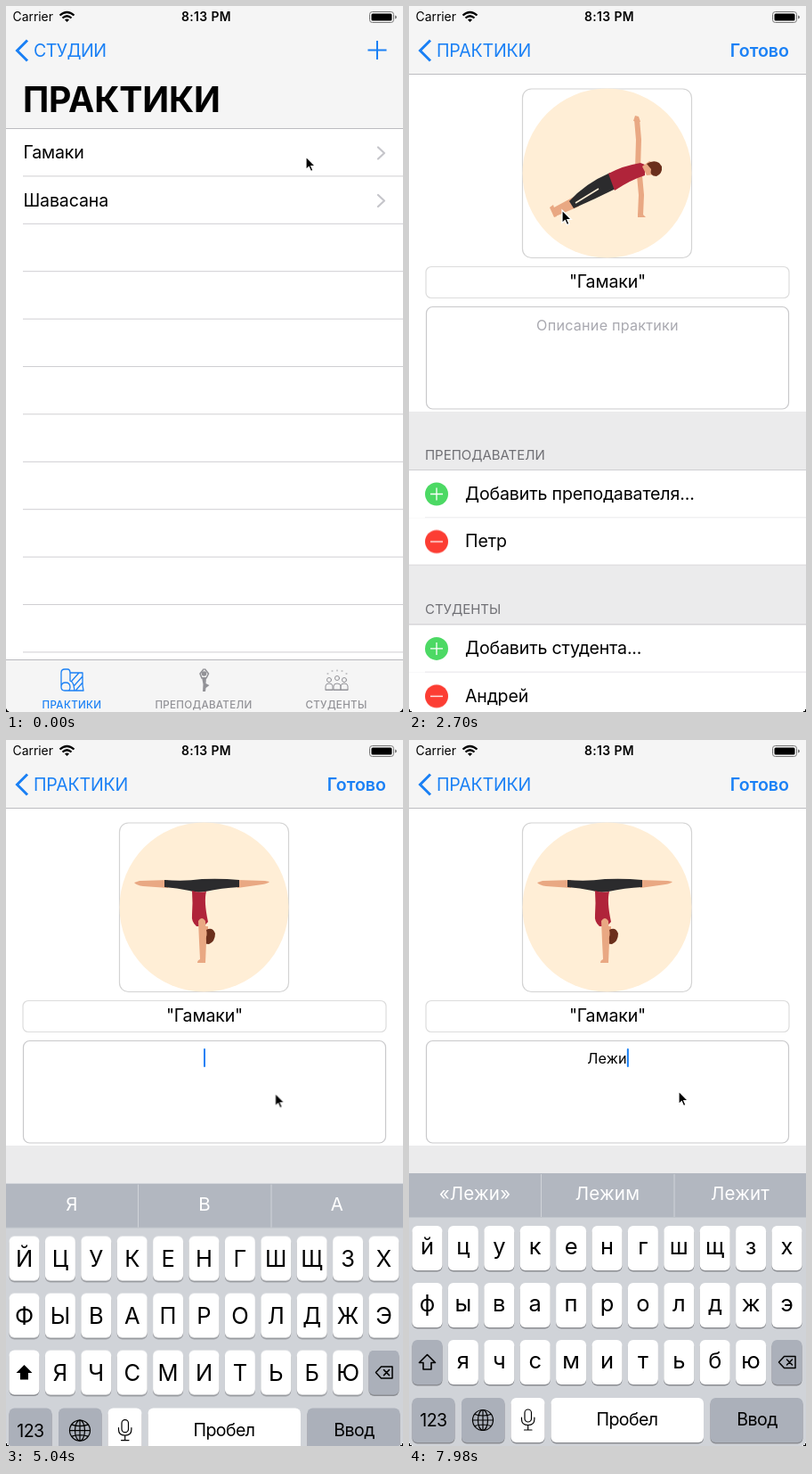
Write an HTML page that moves like this. It is 446 px wide and 792 px high and loops after 8 s.

```html
<!DOCTYPE html>
<html lang="ru">
<head>
<meta charset="utf-8">
<title>Практики</title>
<style>
html, body { margin: 0; width: 100%; height: 100%; overflow: hidden; background: #000; }
svg { display: block; width: 446px; height: 792px; border-radius: 0 0 6px 6px; background: #fff; }
text { font: 400 19.6px Inter, Roboto, sans-serif; letter-spacing: -.008em; }
.blue { fill: #1a80f5; }
.mid { text-anchor: middle; }
.end { text-anchor: end; }
.line { stroke: #cfced2; fill: none; }
.title { font-size: 39.2px; font-weight: 700; letter-spacing: -.004em; }
.back { letter-spacing: -.01em; }
.strong { font-weight: 600; letter-spacing: 0; }
.head { font-size: 15px; letter-spacing: -.002em; fill: #6f6f74; }
.hint { font-size: 16.2px; letter-spacing: .013em; }
.tab { font-size: 11.6px; font-weight: 500; letter-spacing: .025em; }
.status { font-size: 13.9px; letter-spacing: 0; }
.clock { font-weight: 600; letter-spacing: .03em; }
.key { font-size: 25.5px; letter-spacing: 0; }
.label { letter-spacing: -.03em; }
.guess { font-size: 20.5px; letter-spacing: .01em; fill: #fff; }
.icon { fill: none; stroke: currentColor; stroke-linecap: round; stroke-linejoin: round; }

.push, .edit, .fadeOut, .fadeIn, .dim, .glare, .done, .add, .minus, .keys, .pointer { animation: 8s linear infinite; }
.push { animation-name: push; }
.fadeOut { animation-name: fadeOut; }
.fadeIn { animation-name: fadeIn; }
.dim { animation-name: dim; }
.glare { animation-name: glare; }
.edit { animation-name: edit; }
.add { animation-name: add; }
.minus { animation-name: minus; }
.done { animation-name: done; }
.keys { animation-name: keys; }
.pointer { animation-name: pointer; }

@keyframes push {
  0%, 3.3% { transform: var(--from); animation-timing-function: ease; }
  9.55%, 100% { transform: var(--to); }
}
@keyframes fadeOut { 0%, 3.3% { opacity: 1; } 6%, 100% { opacity: 0; } }
@keyframes fadeIn { 0%, 3.5% { opacity: 0; } 7.2%, 100% { opacity: 1; } }
@keyframes dim { 0%, 3.3% { opacity: 0; animation-timing-function: ease; } 9.55%, 100% { opacity: .11; } }
@keyframes glare { 0%, 3.3% { opacity: 0; } 6.5%, 7.8% { opacity: 1; } 10.5%, 100% { opacity: 0; } }
@keyframes edit {
  0%, 21.375% { transform: translate(0, 0); animation-timing-function: ease-in-out; }
  25.75%, 100% { transform: var(--to); }
}
@keyframes add { 0%, 22% { opacity: 0; } 25.75%, 100% { opacity: 1; } }
@keyframes minus { 0%, 22.5% { fill: #e6e6e9; } 25.75%, 100% { fill: #fc3d33; } }
@keyframes done { 0%, 21.49% { opacity: 0; } 21.5% { opacity: .2; } 25%, 100% { opacity: 1; } }
@keyframes keys {
  0%, 59.3125% { transform: translateY(306px); animation-timing-function: cubic-bezier(.38, .7, .125, 1); }
  65.5625%, 100% { transform: none; }
}
@keyframes pointer {
  0%, 11.25% { transform: translate(337px, 169px); animation-timing-function: ease-in-out; }
  18.75%, 23.5% { transform: translate(361px, 59px); animation-timing-function: ease-in-out; }
  30%, 43% { transform: translate(172px, 229px); animation-timing-function: ease-in-out; }
  55%, 60.5% { transform: translate(302px, 398px); animation-timing-function: ease-in-out; }
  66%, 100% { transform: translate(303px, 394px); }
}
</style>
</head>
<body>
<svg id="stage" viewBox="0 0 446 792"></svg>
<script>
const LOOP = 8000, ROW = 53.4;
const EDIT = 1720, FOCUS = 4740, TYPED = [6540, 6960, 7380, 7740];
const stage = document.getElementById('stage');

// Visible from the first time to the second, and so on in pairs.
const during = (times, body) => `<g data-on="${times.join(' ')}">${body}</g>`;
const text = (x, y, str, cls = '', extra = '') => `<text x="${x}" y="${y}" class="${cls}" ${extra}>${str}</text>`;
const rect = (x, y, w, h, fill, extra = '') => `<rect x="${x}" y="${y}" width="${w}" height="${h}" fill="${fill}" ${extra}/>`;
const rule = (x, y) => `<path class="line" d="M${x} ${y}H446"/>`;
const path = (d, fill) => `<path d="${d}" fill="${fill}"/>`;
const limb = (d, color, width) => `<path d="${d}" fill="none" stroke="${color}" stroke-width="${width}" stroke-linejoin="round"/>`;
const shift = (x, y) => `class="edit" style="--to:translate(${x}px,${y}px)"`;
const pushed = (from, to) => `style="--from:translate(${from});--to:translate(${to})"`;

function listPage() {
  let rows = '';
  for (let i = 1; i <= 11; i++) rows += rule(19, 137.5 + ROW * i);
  const chevron = y => `<path class="icon" color="#c5c5ca" stroke-width="2.2" d="M418 ${y - 6}l7 6.500-7 6.500"/>`;
  return `<g class="push" ${pushed('0,0', '-134px,0')}>
    ${rect(0, 0, 446, 792, '#fff')}
    ${during([120], rect(0, 138, 446, 53, '#d9d9de'))}
    ${rows}
    ${text(19.5, 171, 'Гамаки')}${chevron(164.5)}
    ${text(19.5, 224.5, 'Шавасана')}${chevron(218)}
    ${rect(0, 734, 446, 58, '#f5f5f5')}<path stroke="#b9b9bd" d="M0 733.500H446"/>
    <g color="#1a80f5" class="icon" stroke-width="1.3">
      <path d="M62 764V748q0-4 4-4h3q3 0 3 4h14v14l1 6H66q-4 0-4-4zM72 748v9q3 1 4 5l1 6M62 764q0-5 5-5t5 5-4 4M74 757l8-9M77 762l9-10M79 767l7-8"/>
    </g>
    <g fill="#929297">
      <circle cx="222.500" cy="749" r="2.800"/>
      <path d="M220 753h5l-.5 7 4 2-4 3-.5 4h-3l.5-8z"/>
      <path class="icon" color="#929297" stroke-width="1.600" d="M220 754l-2-5 4-5M225 754l2.500-5-4-5"/>
    </g>
    <g color="#929297" class="icon" stroke-width="1">
      ${[[363, 756], [372, 754], [380, 756]].map(([x, y]) =>
        `<circle cx="${x}" cy="${y}" r="2.500"/><path d="M${x - 4} 767v-4q0-3 4-3t4 3v4z"/>`).join('')}
      <path d="M361 749h1M366 746h1M372 745v1M377 746h1M382 749h1M359 767h25"/>
    </g>
    ${text(74, 788, 'ПРАКТИКИ', 'tab mid blue')}
    ${text(222, 788, 'ПРЕПОДАВАТЕЛИ', 'tab mid', 'fill="#929297"')}
    ${text(371, 788, 'СТУДЕНТЫ', 'tab mid', 'fill="#929297"')}
  </g>
  <rect class="dim" width="446" height="792"/>`;
}

const SKIN = '#e9a883', RED = '#b0243a', DARK = '#2b2b2d', HAIR = '#6b2f1c';

const dogPose =
  limb('M188 199L180 219', SKIN, 6) + limb('M234 201L243 219', SKIN, 6) +
  path('M174 222q0-3 8-6l3 6zM238 218l6-1 6 4v1h-13z', SKIN) +
  path('M203 157q5-7 14-4l1 13-27 37-9-5z', DARK) +
  path('M206 154l13 1 4 16 16 29-9 4-19-32z', DARK) +
  path('M215 153q18-2 30 12 6 6 5 15l-10 3-6-10-13-4q-6-6-6-16z', RED) +
  path('M240 182l10-3q4 6 3 15l-8 4z', SKIN) +
  path('M241 196q7-7 15-2l-1 10q-7 5-14-2z', HAIR) +
  limb('M246 178L255 198 264 220', SKIN, 5.500) + limb('M249 177L259 198 269 221', SKIN, 4.500);

const plankPose =
  limb('M257 183L258 150 256 127', SKIN, 6) + path('M252 129l2-6 4 1 2 6z', SKIN) +
  limb('M259 190L261 212 260 235', SKIN, 6) + path('M257 233h5l4 4h-9z', SKIN) +
  limb('M188 216L162 230M190 222L164 233', SKIN, 6) + path('M158 226l4-3 4 13-3 1z', SKIN) +
  path('M180 219q18-20 46-32l6 18q-22 11-47 22z', DARK) +
  limb('M187 221L213 205', '#ffeed6', 1.500) +
  path('M224 188q17-9 36-12l5 2v12q-16 5-34 17z', RED) +
  path('M262 180l8-6 6 3v12l-9 1z', SKIN) +
  path('M267 177q8-5 14-1l3 4q1 8-6 11-8 0-6-8z', HAIR);

const handstandPose =
  path('M144 160l6-2 32-1v9l-28-2q-7-1-10-4zM296 159l-5-1-31-1v9l28-4q6-1 8-3z', SKIN) +
  path('M178 157q22 2 42-1 22-1 42 1v8q-20 1-38 5-10 2-18-1-14-3-28-4z', DARK) +
  path('M209 169q7 3 16 1-3 11 2 34l-5 5h-8q-6-5-5-13 1-13 0-27z', RED) +
  path('M221 209h6v14l-5 4z', SKIN) +
  path('M225 213q7-4 10 4 0 9-7 12-6 0-5-5 4-4 2-11z', HAIR) +
  path('M216 203q4-6 8 0l1 23-1 24h-9q0-3 3-4l-1-20z', SKIN);

const minusRow = (y, name, lineX) => `
  ${rect(0, y, 446, ROW, '#fff')}${rule(lineX, y + ROW)}
  <g ${shift(44, 0)}><circle class="minus" cx="-13" cy="${y + 27}" r="13"/>
    <path stroke="#fff" stroke-width="1.300" d="M-20 ${y + 27}h14"/></g>
  <g ${shift(45, 0)}>${text(18, y + 33.5, name)}</g>`;

const addRow = (y, label) => `<g class="add">
  ${rect(0, y, 446, ROW, '#fff')}${rule(0, y)}${rule(18, y + ROW)}
  <circle cx="31" cy="${y + 27}" r="13" fill="#4cd964"/>
  <path stroke="#fff" stroke-width="1.300" d="M24 ${y + 27}h14M31 ${y + 20}v14"/>
  ${text(63, y + 33.5, label)}</g>`;

function detailPage() {
  const typed = TYPED.map((start, i) => during([start, TYPED[i + 1] || LOOP + 1],
    text(222.5, 363, 'Лежи'.slice(0, i + 1), 'hint mid typed') + rect(0, 346, 2, 21, '#1a80f5', 'rx="1"'))).join('');
  const box = (x, y, w, h, r, stroke) => rect(x, y, w, h, '#fff', `rx="${r}" stroke="${stroke}" stroke-width="1.200"`);
  return `<g class="push" clip-path="url(#page)" ${pushed('446px,0', '0,0')}>
    ${rect(0, 0, 446, 792, '#fff')}
    ${during([EDIT], box(127.5, 93, 190, 189.5, 10, '#d3d3d3') + box(19, 292.5, 408, 35, 6, '#dcdcdc') + box(19.5, 337.5, 407, 114.5, 7, '#c9c9cb'))}
    <circle cx="222.500" cy="187.500" r="95" fill="#ffeed6"/>
    ${during([0, 2460], dogPose)}${during([2460, 3240], plankPose)}${during([3240], handstandPose)}
    ${text(223, 316, '"Гамаки"', 'mid')}
    ${during([0, FOCUS], text(223, 364, 'Описание практики', 'hint mid', 'fill="#a9a9b0"'))}
    ${during([FOCUS, 5300, 5700, 6300], rect(222, 346, 2, 21, '#1a80f5', 'rx="1"'))}
    ${typed}
    ${rect(0, 455, 446, 337, '#ebebec')}
    ${text(18, 509, 'ПРЕПОДАВАТЕЛИ', 'head')}
    ${rule(0, 520.5)}
    ${addRow(520.5, 'Добавить преподавателя...')}
    <g ${shift(0, ROW)}>${minusRow(520.5, 'Петр', 0)}</g>
    <g ${shift(0, ROW)}>
      ${text(18, 629, 'СТУДЕНТЫ', 'head')}
      ${rule(0, 640.5)}
      ${addRow(640.5, 'Добавить студента...')}
      <g ${shift(0, ROW)}>${minusRow(640.5, 'Андрей', 18)}${minusRow(640.5 + ROW, 'Елена', 0)}</g>
    </g>
  </g>`;
}

function navBar() {
  return `<g class="push" ${pushed('0,0', '0,-61px')}>
    ${rect(0, 0, 446, 138, '#f5f5f5')}<path stroke="#bcbcc0" d="M0 137.500H446"/></g>
  <rect class="glare" x="280" width="166" height="80" fill="url(#glare)"/>
  <path class="icon" color="#1a80f5" stroke-width="3" style="stroke-linecap:butt;stroke-linejoin:miter" d="M24 38.500L12.500 50 24 61.500"/>
  <g class="fadeOut">
    <g class="push" ${pushed('0,0', '-70px,0')}>${text(31, 57, 'СТУДИИ', 'blue', 'style="letter-spacing:-.03em"')}</g>
    <path stroke="#1a80f5" stroke-width="2" d="M406.500 49.500h21M417 39v21"/>
    <g class="push" style="--from:translate(20px,119px) scale(1);--to:translate(31px,57px) scale(.475)">
      ${text(-1, 0, 'ПРАКТИКИ', 'title')}</g>
  </g>
  <g class="fadeIn">
    <g class="push" style="--from:translate(20px,119px) scale(2.1);--to:translate(31px,57px) scale(1)">
      ${text(0, 0, 'ПРАКТИКИ', 'back blue')}</g>
    ${during([0, EDIT], text(427, 57, 'Редактировать', 'end blue'))}
  </g>
  <g class="done">${text(427, 57, 'Готово', 'end blue strong')}</g>
  ${text(7.5, 17, 'Carrier', 'status')}
  ${text(225, 17, '8:13 PM', 'status mid clock')}
  <g fill="none" stroke="#000" stroke-width="2.300">
    <path d="M60.500 10.500q8-7 16 0M63.500 13.500q5-4.500 10 0"/><path d="M66 15.500q2.500-2 5 0l-2.500 2.500z" fill="#000" stroke="none"/></g>
  ${rect(408.5, 6.5, 27, 12, 'none', 'rx="3" stroke="#777"')}${rect(410.5, 8.5, 23, 8, '#000', 'rx="1.500"')}
  <path d="M437 10.500q2 .5 2 2t-2 2z" fill="#777"/>`;
}

function keyboard() {
  const GREY = '#abb0ba', PITCH = 40.4, lines = ['йцукенгшщзх', 'фывапролджэ', ' ячсмитьбю'];
  const key = (x, y, w, fill = '#fff') => rect(x, y + 1.5, w, 50, '#8b8d92', 'rx="6"') + rect(x, y, w, 50, fill, 'rx="6"');
  let caps = '', small = '', keys = '';
  lines.forEach((letters, r) => [...letters].forEach((ch, i) => {
    if (ch === ' ') return;
    const x = 3.5 + i * PITCH, y = 545 + r * 64;
    keys += key(x, y, 34);
    caps += text(x + 17, y + 34, ch.toUpperCase(), 'key mid');
    small += text(x + 17, y + 32, ch, 'key mid');
  }));
  const arrow = 'M20.500 689.500l-9 9h4.500v7.500h9v-7.500h4.500z';
  const guesses = [
    [0, 'Я', 'В', 'А'],
    [TYPED[0], '«Л»', 'Ли', 'Ла'],
    [TYPED[1], '«Ле»', 'Лет', 'Лев'],
    [TYPED[2], '«Леж»', 'Лежу', 'Лежа'],
    [TYPED[3], '«Лежи»', 'Лежим', 'Лежит']
  ];
  const guessBar = guesses.map(([start, ...words], i) => during([start, guesses[i + 1]?.[0] || LOOP + 1],
    words.map((w, k) => text(74 + 149 * k, 516, w, 'guess mid')).join(''))).join('');
  return `<g class="keys">
    ${rect(0, 486, 446, 306, '#d0d3d8')}${rect(0, 486, 446, 49.5, '#b2b7c0')}
    <path stroke="#d0d3d9" d="M148.500 487v48M298 487v48"/>
    ${guessBar}${keys}
    ${during([0, TYPED[0]], caps + key(3.5, 673, 34) + `<path d="${arrow}"/>`)}
    ${during([TYPED[0]], small + key(3.5, 673, 34, GREY) + `<path class="icon" color="#000" stroke-width="1.600" d="${arrow}"/>`)}
    ${key(3.5 + 10 * PITCH, 673, 34, GREY)}
    ${key(3.5, 738, 48, GREY)}${key(59, 738, 48.5, GREY)}${key(114.5, 738, 38)}${key(159.5, 738, 171.5)}${key(338.5, 738, 104, GREY)}
    <g class="icon" color="#000" stroke-width="1.200">
      <path d="M415.500 698l6-6.500h12.500v13h-12.500zM424.500 695l6 6M430.500 695l-6 6" stroke-width="1.500"/>
      <circle cx="83" cy="763" r="11.500"/><ellipse cx="83" cy="763" rx="5.500" ry="11.500"/>
      <path d="M83 751.500v23M71.500 763h23M74 756.500q9 3 18 0M74 769.500q9-3 18 0"/>
      <rect x="130" y="751" width="7.500" height="14" rx="3.700"/><path d="M126.500 760v2q0 6.500 7.200 6.500t7.200-6.500v-2M133.700 768.500v5M129.500 774h8.500"/>
    </g>
    ${text(27.5, 770, '123', 'mid label')}${text(245, 769, 'Пробел', 'mid label')}${text(391, 769, 'Ввод', 'mid label')}
  </g>`;
}

stage.innerHTML = `
  <defs>
    <clipPath id="page"><rect width="446" height="792"/></clipPath>
    <linearGradient id="glare" gradientUnits="userSpaceOnUse" x1="295" x2="355">
      <stop offset="0" stop-color="#c2c6cb" stop-opacity="0"/><stop offset="1" stop-color="#c2c6cb"/>
    </linearGradient>
  </defs>
  ${listPage()}${detailPage()}${navBar()}${keyboard()}
  <path class="pointer" stroke="#fff" stroke-width="1.200" d="M0 0v14.500l3.300-3 2.200 5 2.500-1.100-2.200-4.900h4.600z"/>`;

stage.querySelectorAll('.typed').forEach(word =>
  word.nextElementSibling.setAttribute('x', 222.5 + word.getComputedTextLength() / 2));

stage.querySelectorAll('[data-on]').forEach(el => {
  const times = el.dataset.on.split(' ').map(Number).filter(t => t < LOOP);
  const frame = (opacity, t) => ({ opacity, offset: t / LOOP, easing: 'step-end' });
  el.animate([frame(0, 0), ...times.map((t, i) => frame(1 - i % 2, t)), frame(times.length % 2, LOOP)],
    { duration: LOOP, iterations: Infinity });
});

// One shared clock for every part.
document.getAnimations().forEach(a => { a.startTime = 0; });
</script>
</body>
</html>
```
